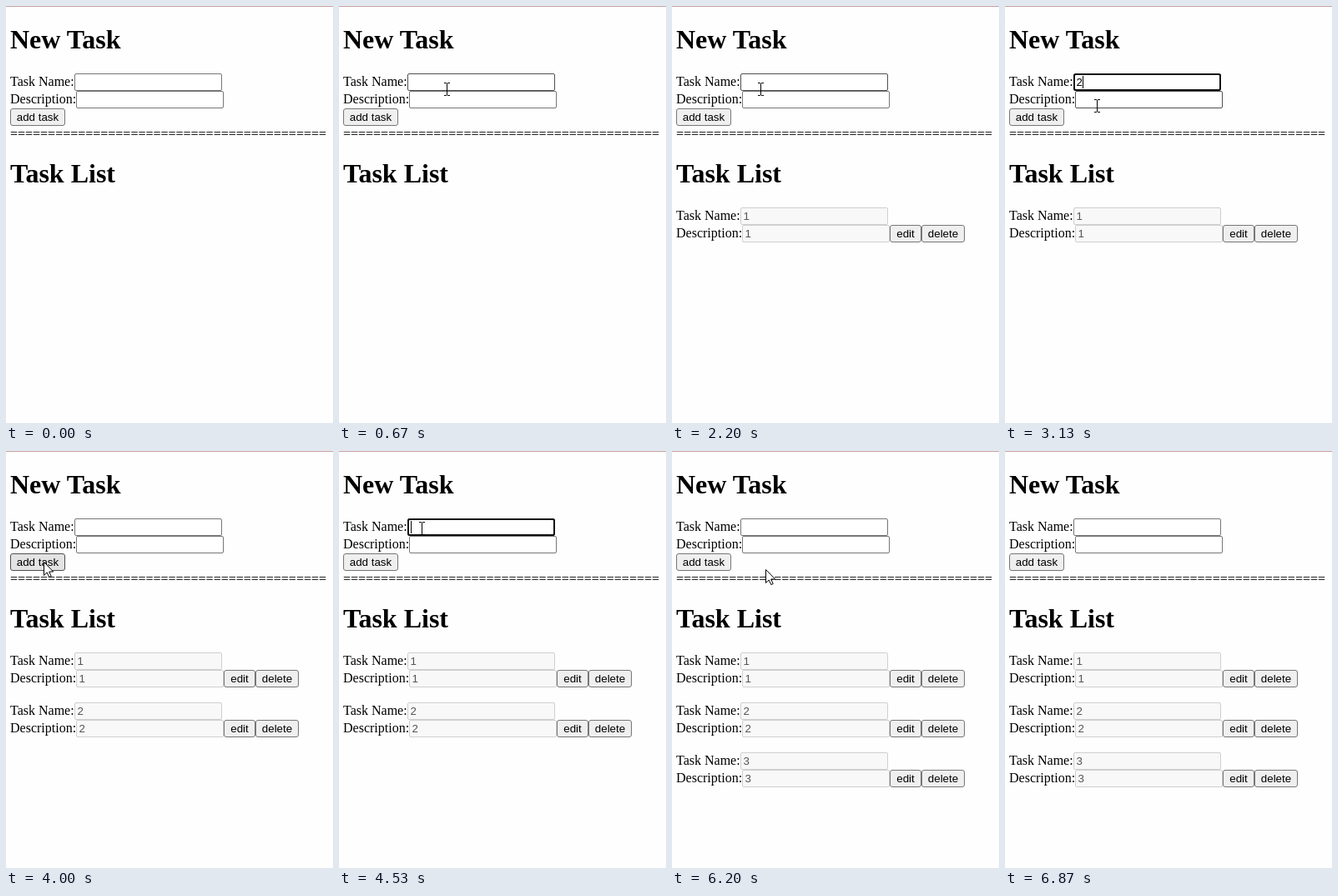
Write an HTML page that moves like this. It is 392 px wide and 501 px high and loops after 7.67 s.

```html
<!DOCTYPE html>
<html lang="en">
<head>
<meta charset="utf-8">
<title>Task list</title>
<style>
  html, body { margin: 0; width: 100%; height: 100%; overflow: hidden; background: #fefefe; }
  svg { display: block; width: 392px; height: 501px; }
  text { font: 16px "Liberation Serif", serif; white-space: pre; }
  .h1 { font-size: 32px; font-weight: bold; }
  .ui { font: 13.333px "Liberation Sans", sans-serif; }
  .mid { text-anchor: middle; }
  .box { fill: #fff; stroke: #767676; }
  .box.hover { stroke: #4f4f4f; }
  .ring { fill: none; stroke: #101010; stroke-width: 2; }
  .off .box { fill: #f8f8f8; stroke: #cfcfcf; }
  .off .value { fill: #545454; }
  .btn { fill: #efefef; stroke: #767676; }
  .btn.hover { fill: #e3e3e3; stroke: #4f4f4f; }
  .btn.down { fill: #f5f5f5; stroke: #8d8d8d; }
  .hide { display: none; }
</style>
</head>
<body>
<svg id="stage" viewBox="0 0 392 501">
  <rect width="392" height="501" fill="#fefefe"/>
  <rect width="392" height="1" fill="#c8a0a0"/>
</svg>
<script>
const LOOP = 7670, TICK = 1000 / 15;
const stage = document.getElementById('stage');

function add(parent, tag, attrs, text = '') {
  const el = document.createElementNS('http://www.w3.org/2000/svg', tag);
  for (const key in attrs) el.setAttribute(key, attrs[key]);
  el.textContent = text;
  return parent.appendChild(el);
}

const show = (el, on) => el.classList.toggle('hide', !on);
const label = (parent, x, y, text, cls = '') => add(parent, 'text', { x, y, class: cls }, text);
const inside = (x, y, w, h) => (px, py) => px >= x && px < x + w && py >= y && py < y + h;

function button(parent, x, y, width, text) {
  const rect = add(parent, 'rect', { x: x + .5, y: y + .5, width: width - 1, height: 20, rx: 2.5, class: 'btn' });
  label(parent, x + width / 2, y + 15, text, 'ui mid');
  return { rect, hit: inside(x, y, width, 21) };
}

function field(parent, x, y, caption) {
  label(parent, 5, y + 15, caption);
  const box = add(parent, 'rect', { x: x + .5, y: y + .5, width: 176, height: 20, rx: 1.5, class: 'box' });
  const ring = add(parent, 'rect', { x: x + 1, y: y + 1, width: 175, height: 19, rx: 2, class: 'ring' });
  const value = label(parent, x + 3.5, y + 15, '', 'ui value');
  const caret = add(parent, 'rect', { y: y + 3, width: 1, height: 15 });
  return {
    hit: inside(x, y, 177, 21),
    set(text, focus, hover) {
      value.textContent = text;
      box.classList.toggle('hover', hover);
      show(ring, focus);
      show(caret, focus);
      caret.setAttribute('x', x + (text ? 11 : 4));
    }
  };
}

function pair(parent, y) {
  return [field(parent, 82, y, 'Task Name:'), field(parent, 84, y + 21, 'Description:')];
}

label(stage, 5, 51, 'New Task', 'h1');
const [nameField, descField] = pair(stage, 81);
const addButton = button(stage, 5, 123, 66, 'add task');
label(stage, 5, 159, '='.repeat(42));
const onRule = inside(5, 144, 379, 18);
label(stage, 5, 212, 'Task List', 'h1');

const tasks = [1, 2, 3].map(n => {
  const y = 182 + 60 * n;
  const group = add(stage, 'g', { class: 'off' });
  for (const f of pair(group, y)) f.set(n, false, false);
  button(group, 261, y + 21, 38, 'edit');
  button(group, 299, y + 21, 52, 'delete');
  return group;
});

const arrow = add(stage, 'path', {
  d: 'M.5.5V16.5L4.2 13L6.8 18.6L9.2 17.5L6.7 12H11.7Z', fill: '#fff', stroke: '#000'
});
const beam = add(stage, 'path', {
  d: 'M-3.5-8H-.5M.5-8H3.5M0-7.5V6.5M-3.5 7H-.5M.5 7H3.5', fill: 'none', stroke: '#000'
});

const moves = [], events = [];
const move = (start, end, x, y) => moves.push({ start, end, x, y });
const at = (time, change) => events.push({ time, change });
const blank = { name: '', desc: '', focus: '', down: false };

// Each round: click the name, type, click the description, type, press the button
const rounds = [
  { name: 870, desc: 1470, press: 1870 },
  { name: 2530, desc: 3200, press: 3930 },
  { name: 4530, desc: 5000, press: 5600 }
];

at(0, { ...blank, count: 0 });
move(0, 0, 328, 423);
let free = 200;
rounds.forEach(({ name, desc, press }, i) => {
  const n = i + 1, typed = desc + (press - desc) * .28, done = press + 70;
  move(free, free + (i ? 330 : 470), 129 - 15 * i, 100 - 3.5 * i);
  at(name, { focus: 'name' });
  at(desc - 270, { name: n });
  move(desc - 270, desc - 70, 110, 120);
  at(desc, { focus: 'desc' });
  at(typed, { desc: n });
  move(typed, typed + 200, 42 + 2.5 * i, 130 + 3 * i);
  at(press, { down: true });
  at(done, { ...blank, count: n });
  free = done;
});
move(6000, 6400, 177, 148);
move(6530, 6800, 349, 299);

function pointerAt(t) {
  let x = 0, y = 0;
  for (const m of moves) {
    if (t < m.start) break;
    const k = m.end > m.start ? Math.min(1, (t - m.start) / (m.end - m.start)) : 1;
    const ease = k * k * (3 - 2 * k);
    x += (m.x - x) * ease;
    y += (m.y - y) * ease;
  }
  return [Math.round(x), Math.round(y)];
}

function draw(t) {
  const s = {};
  for (const e of events) if (e.time <= t) Object.assign(s, e.change);

  // The screen refreshes 15 times a second, on 10 ms marks
  const tick = Math.floor((t + 4) / TICK);
  const [x, y] = pointerAt(Math.round(tick * TICK / 10) * 10);
  const visible = t >= 200 && t < 6870;
  const over = target => visible && target.hit(x, y);
  const isBeam = over(nameField) || over(descField) || onRule(x, y);

  nameField.set(s.name, s.focus === 'name', over(nameField));
  descField.set(s.desc, s.focus === 'desc', over(descField));
  addButton.rect.classList.toggle('hover', over(addButton));
  addButton.rect.classList.toggle('down', s.down);
  tasks.forEach((task, i) => show(task, i < s.count));

  show(arrow, visible && !isBeam);
  show(beam, visible && isBeam);
  arrow.setAttribute('transform', `translate(${x} ${y})`);
  beam.setAttribute('transform', `translate(${x + .5} ${y + .5})`);
}

const start = performance.now();
function frame() {
  draw((performance.now() - start) % LOOP);
  requestAnimationFrame(frame);
}
draw(0);
requestAnimationFrame(frame);
</script>
</body>
</html>
```
